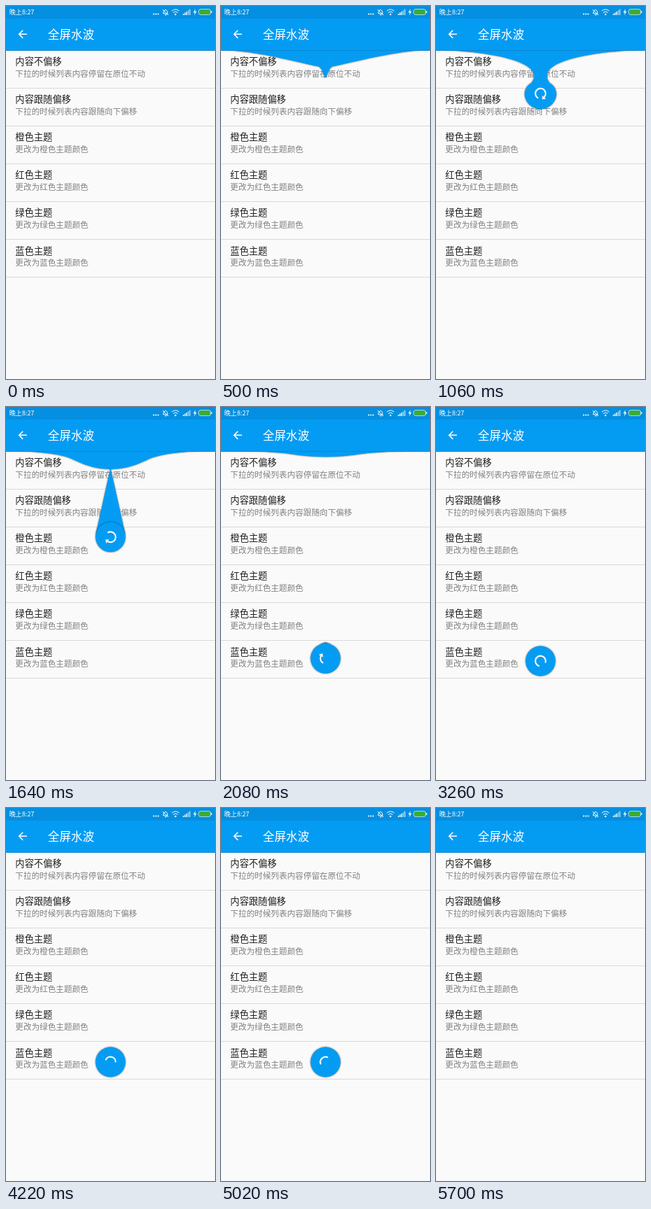
Animation, 300 px wide and 533 px high, one loop 5720 ms. Source, as an HTML page:

```html
<!DOCTYPE html>
<html lang="zh-CN">
<head>
<meta charset="utf-8">
<title>全屏水波</title>
<style>
  html, body { margin: 0; width: 100%; height: 100%; overflow: hidden; background: #fafafa; }
  svg { display: block; width: 300px; height: 533px; }
  text { font-family: "Noto Sans CJK SC", "Noto Sans CJK JP", "Noto Sans", sans-serif; }
  .title { font-size: 13.33px; fill: #212121; }
  .sub { font-size: 11.67px; fill: #808080; }
  .blue { fill: #049cf3; }
  .shade { filter: drop-shadow(0.4px 0.5px 1px rgba(0, 0, 0, .6)); }
  .line { fill: none; stroke: #fff; }
</style>
</head>
<body>
<svg viewBox="0 0 300 533">
  <rect width="300" height="533" fill="#fafafa"/>
  <g id="list"></g>
  <path id="wave" class="blue shade"/>
  <path id="tail" class="blue shade"/>
  <ellipse id="drop" class="blue shade" cx="150"/>
  <rect class="blue" y="18" width="300" height="45"/>
  <rect y="63" width="300" height="1" fill="#0b86cf"/>
  <rect width="300" height="18" fill="#058fe0"/>
  <g id="icon">
    <path id="arc" class="line" stroke-width="2.1"/>
    <path id="head" d="M-3.6 0H3.6L0 4.2Z" fill="#fff"/>
  </g>

  <text x="4.7" y="12.2" font-size="9.1" fill="#fff">晚上8:27</text>
  <g fill="#fff">
    <circle cx="212" cy="11.5" r="1.1"/><circle cx="215.2" cy="11.5" r="1.1"/><circle cx="218.4" cy="11.5" r="1.1"/>
    <path d="M254 13V11h1.4v2ZM256.3 13V9.5h1.4V13ZM258.6 13V8H260v5Z"/>
    <path d="M260.9 13V6.3h1.4V13ZM263.2 13V4.6h1.4V13Z" opacity=".7"/>
    <path d="M272 4L268.8 9.2H271L270 13.4L273.6 7.8H271.3Z"/>
    <circle cx="243.3" cy="12" r="1.2"/>
  </g>
  <g class="line" stroke-width="1">
    <path d="M238 7Q243.3 2.8 248.6 7M240 9.4Q243.3 6.6 246.6 9.4"/>
    <path d="M225.6 10.6L232 11.4L231.4 7.4Q229 3.4 226.4 7.4ZM228 12.8H230.4M224.8 5L233 13"/>
    <rect x="276.7" y="4.7" width="17" height="7.6" rx="2.4" stroke="#cfe9c8"/>
  </g>
  <rect x="277.4" y="5.4" width="15.6" height="6.2" rx="1.8" fill="#3cae25"/>
  <rect x="294.4" y="7" width="1.2" height="3" fill="#fff"/>

  <path class="line" stroke-width="1.6" d="M30 40.3H19M24.3 34.7L18.7 40.3L24.3 45.9"/>
  <text x="60" y="46.6" font-size="16.67" fill="#fff">全屏水波</text>
</svg>
<script>
const LOOP = 5720, W = 300, TOP = 63, R = 21.5, FALL = 300, FALL_FROM = 106;
const DRAG = 100, RELEASE = 1525, DROP = 610, SPIN = 2338, CYCLE = 1595, HIDE = 5260, SHRINK = 244;
const { min, max, sin, cos, PI, round } = Math;
const $ = id => document.getElementById(id);
const set = (id, name, value) => $(id).setAttribute(name, value);
const clamp = v => min(1, max(0, v));
const rad = deg => deg * PI / 180;

const rows = [
  ['内容不偏移', '下拉的时候列表内容停留在原位不动'],
  ['内容跟随偏移', '下拉的时候列表内容跟随向下偏移'],
  ...['橙', '红', '绿', '蓝'].map(c => [c + '色主题', `更改为${c}色主题颜色`])
];
$('list').innerHTML = rows.map(([title, sub], i) => {
  const y = i * 54.15;
  return `<text class="title" x="13.33" y="${round(83.8 + y)}">${title}</text>
    <text class="sub" x="13.33" y="${round(100.6 + y)}">${sub}</text>
    <rect y="${round(116.6 + y)}" width="300" height="1" fill="#d9d9d9"/>`;
}).join('');

// Pull shapes as fractions of the width: two Béziers for the left half
const BEGIN = [[.1655, 0], [.4188, -.0109], [.4606, -.0049], [.4893, 0], [.4893, .0487], [.5, .0487]];
const APPEAR = [[.1655, 0], [.5237, .0553], [.4557, .0936], [.3908, .1302], [.4303, .2173], [.5, .2173]];
const EXPAND = [[.1655, 0], [.545, .04], [.4557, .1642], [.3941, .2061], [.4303, .2889], [.5, .2889]];

const toward = (from, to, step) => from < to ? min(from + step, to) : max(from - step, to);

function pullPoints(p) {
  const m1 = min(p, .1), m2 = clamp(p - .1), m3 = clamp(p - .26);
  const grow = clamp(p / .04);
  return BEGIN.map(([x, y], i) => {
    const y1 = i ? y * grow + m1 : 0;
    if (!m2) return [x, y1];
    const [ax, ay] = APPEAR[i], [ex, ey] = EXPAND[i];
    const x2 = toward(x, ax, min(m2, .16));
    const y2 = i < 3 ? max(y1 - m2, ay) : min(y1 + min(m2, .16), ay);
    return [toward(x2, ex, m3), toward(y2, ey, m3)];
  });
}

function pullPath(pts) {
  const at = (i, flip) => `${W * (flip ? 1 - pts[i][0] : pts[i][0])} ${TOP + W * pts[i][1]} `;
  return `M0 ${TOP}C${at(0)}${at(1)}${at(2)}C${at(3)}${at(4)}${at(5)}` +
    `C${at(4, 1)}${at(3, 1)}${at(2, 1)}C${at(1, 1)}${at(0, 1)}${W} ${TOP}Z`;
}

function wavePath(h) {
  const y = k => TOP + h * k;
  return `M0 ${TOP}Q75 ${TOP} 100 ${y(.5)}Q150 ${y(1.4)} 200 ${y(.5)}Q225 ${TOP} 300 ${TOP}Z`;
}

// Tangents from the tip to the circle
function tailPath(cy, tip) {
  const dist = cy - tip;
  if (dist < R + .05) return '';
  const c = R / dist, dx = R * Math.sqrt(1 - c * c), y = cy - R * c;
  return `M150 ${tip}L${150 + dx} ${y}H${150 - dx}Z`;
}

function setDrop(cy, rx, ry) {
  set('drop', 'cy', cy);
  set('drop', 'rx', rx);
  set('drop', 'ry', ry);
}

const smooth = v => .5 - cos(PI * clamp(v)) / 2;

function bounce(v) {
  v *= 1.1226;
  if (v < .3535) return 8 * v * v;
  if (v < .7408) return 8 * (v - .54719) ** 2 + .7;
  if (v < .9644) return 8 * (v - .8526) ** 2 + .9;
  return 8 * (v - 1.0435) ** 2 + .95;
}

// Two decaying squashes
function squash(v) {
  if (v >= 0 && v < .25) return .6 - 38.4 * (v - .125) ** 2;
  if (v >= .5 && v < .75) return .3 - 19.2 * (v - .625) ** 2;
  return 0;
}

// cubic-bezier(.4, 0, .2, 1)
function swift(x) {
  if (x <= 0) return 0;
  if (x >= 1) return 1;
  let a = 0, b = 1;
  for (let i = 0; i < 20; i++) {
    const u = (a + b) / 2, v = 1 - u;
    if (1.2 * u * v * v + .6 * u * u * v + u ** 3 < x) a = u; else b = u;
  }
  return 3 * a * a * (1 - a) + a ** 3;
}

function drawIcon(y, start, end, arrow, scale, alpha) {
  const r = 7.4, pt = deg => `${r * cos(rad(deg))} ${r * sin(rad(deg))}`;
  set('icon', 'transform', `translate(150 ${y}) scale(${scale})`);
  set('icon', 'opacity', alpha);
  set('arc', 'd', `M${pt(start)}A${r} ${r} 0 ${end - start > 180 ? 1 : 0} 1 ${pt(end)}`);
  set('head', 'transform', `rotate(${end}) translate(${r} 0)`);
  set('head', 'opacity', arrow ? 1 : 0);
}

function drawPull(t) {
  const p = .6 * clamp((t - DRAG) / (RELEASE - DRAG)) ** 1.57;
  const pts = pullPoints(p), end = 100 - (.6 - p) * 199;
  set('wave', 'd', p ? pullPath(pts) : '');
  set('tail', 'd', '');
  setDrop(0, 0, 0);
  drawIcon(TOP + W * pts[5][1] - 22, end - 288 * clamp(p / .26), end, true, 1, clamp((p - .08) / .16));
}

function drawDrop(t) {
  const age = t - RELEASE, fall = smooth(age / DROP), beat = age / DROP - 1;
  const swing = age / (2 * DROP);
  set('wave', 'd', swing < 1 ? wavePath(30 * (1 - bounce(swing))) : '');

  const scale = 1 - clamp((t - HIDE) / SHRINK);
  const wide = squash(beat), tall = squash(beat - .25);
  const cy = TOP + FALL_FROM + (FALL - FALL_FROM) * fall, tip = TOP + (FALL - R) * fall;
  set('tail', 'd', tailPath(cy, tip));
  setDrop(cy, R * (1 + wide - tall / 2) * scale, R * (1 - wide / 2 + tall) * scale);

  if (t < SPIN) {
    const left = 1 - age / (SPIN - RELEASE), end = 258 - 158 * left;
    drawIcon(cy, end - 288 * left, end, true, scale, 1);
  } else {
    const time = t - SPIN, turn = Math.floor(time / CYCLE), f = time / CYCLE - turn;
    const base = 258 + .199 * time + 288 * turn;
    drawIcon(cy, base + 288 * swift(2 * f - 1), base + 288 * swift(2 * f) + 10, false, scale, scale ? 1 : 0);
  }
}

function frame() {
  const t = performance.now() % LOOP;
  (t < RELEASE ? drawPull : drawDrop)(t);
  requestAnimationFrame(frame);
}
frame();
</script>
</body>
</html>
```
